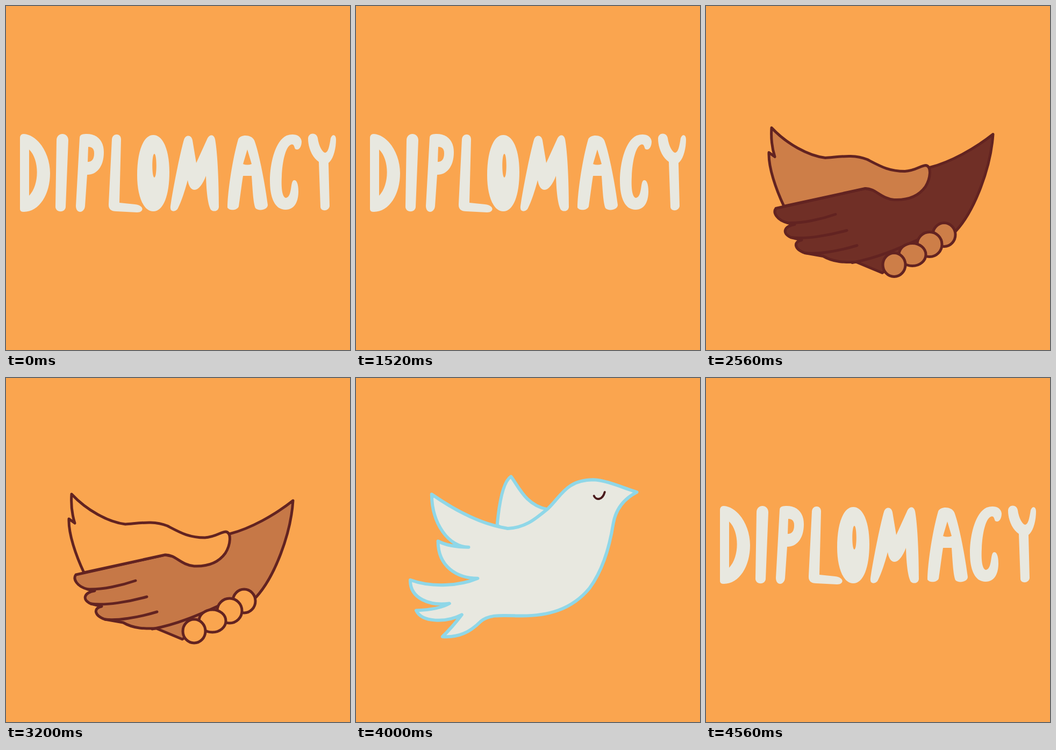
Recreate the animation shown at these times as an HTML page. Size 640 by 640 pixels, loop 4.72 s.

```html
<!DOCTYPE html>
<html lang="en">
<head>
<meta charset="utf-8">
<title>Diplomacy</title>
<style>
  html, body { margin: 0; width: 100%; height: 100%; overflow: hidden; background: #faa54f; }
  svg { display: block; width: 100vw; height: 100vh; --k: 0%; --m: 0%; }
  path, ellipse { stroke-linecap: round; stroke-linejoin: round; }
  #word path { fill: #e8e8e0; fill-rule: evenodd; transform-box: fill-box; transform-origin: center; }
  .skin { stroke: #622321; stroke-width: 5; }
  .thick { stroke-width: 6; }
  .line { fill: none; }
  .thin { stroke-width: 4; }
  .left { fill: color-mix(in srgb, #c67847, #faa54f var(--k)); }
  .right { fill: color-mix(in srgb, #622321, #c67847 var(--k)); }
  #bird path {
    fill: color-mix(in srgb, #d98b4c, #e8e8e0 var(--m));
    stroke: color-mix(in srgb, #622321, #8fd7e8 var(--m));
    stroke-width: 6;
  }
  #bird .line { fill: none; }
  #bird #eye { stroke: #4a1a1c; stroke-width: 4; }
</style>
</head>
<body>
<svg viewBox="0 0 640 640" xmlns="http://www.w3.org/2000/svg">
  <defs><clipPath id="grip"><rect x="140" width="358" height="640"/></clipPath></defs>

  <g id="word" role="img" aria-label="DIPLOMACY">
    <path d="M26 246Q26 238 33 238C60 240 82 275 82 311C82 350 62 383 33 383Q26 383 26 378ZM43 267C62 285 63 332 43 353Z"/>
    <path d="M94 250C94 234 116 234 116 250L111 374C110 385 93 385 92 374Z"/>
    <path d="M137 245Q137 238 148 238C170 237 182 251 182 272C182 300 168 314 151 314L147 372C146 386 130 387 130 372ZM153 262Q164 262 164 274Q164 290 152 290Z"/>
    <path d="M197 248C198 236 214 236 214 248L211 366L240 369C258 371 257 384 244 384L205 382Q190 382 191 368Z"/>
    <path/>
    <path d="M331 249C334 239 345 239 347 250L354 292L374 248C378 238 387 238 389 248C393 270 396 320 396 374C395 383 385 383 381 379C376 370 373 350 372 316C366 332 358 342 351 342C344 342 340 335 338 324C334 340 326 365 320 376C317 383 306 384 306 376C306 366 322 280 331 249Z"/>
    <path d="M432 248C436 239 456 238 462 250C470 270 482 330 487 370C487 380 469 382 464 376C460 366 459 345 457 316L441 316C438 335 435 360 433 373C430 381 415 381 412 375C412 350 420 290 432 248ZM449 267L457 294Q449 297 441 294Z"/>
    <path d="M550 252C549 240 535 236 522 241C502 250 491 290 491 325C491 360 502 379 520 379C538 379 544 362 544 345C544 326 538 322 534 325C529 330 532 355 521 357C513 356 512 335 513 317C514 290 520 262 530 258C536 256 536 262 538 266C545 270 550 262 550 252Z"/>
    <path d="M562 247C562 235 578 234 580 246C582 260 588 272 594 273C600 272 602 258 604 246C607 237 614 239 614 248C614 268 608 286 600 292L602 372C601 382 586 383 585 374L582 290C570 282 562 264 562 247Z"/>
  </g>

  <g id="leftHand" class="skin thick">
    <path class="left" d="M-60 157L-10 198C30 236 62 259 100 263C130 259 160 268 190 268C212 267 230 262 244 261C256 262 252 283 240 293C228 304 205 306 188 309C215 325 240 345 285 357C303 361 300 377 281 375L262 374C280 382 291 390 285 400C278 408 260 406 248 404C266 408 274 418 268 427C258 436 235 432 220 428C236 436 238 450 226 455C200 462 150 460 110 446C62 427 22 388 -10 349L-60 290"/>
    <g class="line thin">
      <path d="M179 310L200 307M262 375C235 370 205 358 180 345M248 404C222 402 195 394 177 383M220 428C200 428 175 420 160 414"/>
      <path d="M108 331C125 350 133 380 131 404M116 346C130 347 148 344 161 339"/>
    </g>
  </g>
  <g id="rightHand" class="skin thin">
    <path class="right" d="M700 155L650 200C615 235 580 262 545 270C510 270 480 277 450 276C425 274 400 270 388 270C376 274 382 293 396 304C410 316 425 318 441 320C415 337 390 355 350 364C332 368 330 386 350 389L366 388C345 396 340 410 352 417C358 421 366 419 374 419C360 424 360 440 372 445C385 447 395 445 406 445C396 452 396 468 412 471C450 474 500 468 545 450C594 430 630 396 650 358L700 300"/>
  </g>

  <g id="bird">
    <path id="wing"/>
    <path id="body"/>
    <g id="folds">
      <path class="line" d="M282 288Q305 284 322 272"/>
      <path class="line" style="stroke-width:9" d="M436 393C420 415 395 432 340 442"/>
    </g>
    <path class="line" id="eye" d="M446 218C450 227 462 226 466 211"/>
  </g>

  <g id="shake" class="skin">
    <g id="arms" class="thick">
      <path class="left" d="M-10 196C30 215 90 222 150 246L200 262L145 362C100 380 40 370 -10 345"/>
      <path class="right" d="M650 200C610 220 560 235 500 254L470 400C530 400 600 400 650 360"/>
    </g>
    <g id="clasp">
      <path class="right" d="M534 228C500 255 455 280 416 290L350 340L296 329L130 366C124 374 132 388 152 393L165 396C146 399 140 412 158 420L178 425C162 428 164 442 184 449L218 455C240 468 265 466 280 466L328 486L380 450L465 408C500 370 530 290 534 228Z"/>
      <path class="line" d="M152 393C180 394 215 386 241 377M158 420C185 424 230 416 262 407M184 449C205 452 245 446 281 435M272 467C320 458 360 440 395 424"/>
      <path class="left" d="M122 216C150 246 190 268 222 272C250 270 275 265 300 275C325 288 340 297 370 297C390 296 400 286 409 286C420 288 418 310 408 326C395 344 375 351 350 350C325 348 315 328 296 329L145 362C130 330 116 290 117 262L128 270Q120 245 122 216Z"/>
      <g class="left">
        <ellipse cx="443" cy="415" rx="21" ry="22"/>
        <ellipse cx="416" cy="433" rx="23" ry="23"/>
        <ellipse cx="384" cy="452" rx="25" ry="21"/>
        <ellipse cx="350" cy="471" rx="21" ry="22"/>
      </g>
    </g>
  </g>
</svg>
<script>
  const STEP = 80, FRAMES = 59;
  const ENTER = 25, CLASP = 29, LOOSE = 31, HATCH = 40, GLIDE = 45, TAKEOFF = 49, FLAP = 53, GONE = 57;

  const $ = id => document.getElementById(id);
  const svg = document.querySelector('svg');
  const letters = [...$('word').children];

  const ring = 'M274 240C293 240 304 270 304 309C304 352 293 382 274 382C255 382 244 352 244 315C244 272 255 240 274 240Z';
  const narrowO = ring + 'M276 275C281 275 281 319 276 319C271 319 271 275 276 275Z';
  const wideO = ring + 'M279 268C290 268 287 306 278 306C269 306 271 268 279 268Z';

  // Same commands in each outline, so their numbers can be blended
  const claspShape = 'M122 216C150 246 190 268 222 272C275 262 325 297 370 297C390 296 416 290 440 279C475 265 505 250 534 228'
    + 'C531 260 524 295 513 320C501 352 487 385 465 408'
    + 'C460 450 400 470 372 475C362 497 340 497 328 486C310 478 290 466 280 466C260 468 240 465 218 455'
    + 'C205 452 190 451 184 449C164 442 162 428 178 425C175 424 164 422 158 420C140 412 146 399 165 396'
    + 'C132 388 124 374 130 366C135 364 140 363 145 362C130 330 100 260 122 216Z';
  const glideShape = 'M143 215C190 248 240 272 285 279C320 278 340 258 360 242C385 218 395 188 445 188C470 189 500 203 526 211'
    + 'C505 222 487 240 482 270C474 320 460 360 438 390'
    + 'C405 430 360 444 300 442C270 441 250 440 235 452C215 472 195 483 163 481C178 467 190 452 199 440'
    + 'C170 455 125 455 114 432C140 431 160 428 176 419C140 424 102 410 103 375C145 390 195 386 229 372'
    + 'C190 372 155 350 155 303C168 310 190 314 212 314C175 314 143 270 143 215Z';
  const flapShape = 'M321 121C360 170 430 182 490 200C550 212 590 170 614 134C645 95 670 81 704 81C736 83 775 101 808 111'
    + 'C781 126 758 149 752 188C741 253 723 305 695 344'
    + 'C650 385 590 410 530 412C500 411 475 406 455 407C430 432 400 466 340 463C360 445 373 425 376 407'
    + 'C350 420 295 430 278 395C305 394 330 388 352 381C310 386 265 370 264 321C315 335 385 333 434 318'
    + 'C390 322 345 295 347 264C362 270 395 270 412 260C350 245 300 180 321 121Z';
  const glideWing = 'M265 273C268 240 275 192 291 182C305 200 318 235 358 243L310 300Z';
  const flapWing = 'M460 190C460 140 480 95 502 75C515 115 560 165 590 158L520 230Z';

  const mix = (a, b, k) => a + (b - a) * k;
  function blend(from, to, k) {
    const ends = to.match(/[\d.]+/g);
    let i = 0;
    return from.replace(/[\d.]+/g, n => mix(+n, +ends[i++], k).toFixed(1));
  }

  const clamp = v => Math.min(1, Math.max(0, v));
  const show = (el, on) => { el.style.display = on ? '' : 'none'; };
  const move = (el, x, y) => el.setAttribute('transform', `translate(${x} ${y})`);
  const percent = (name, v) => svg.style.setProperty(name, v * 100 + '%');

  letters[4].setAttribute('d', narrowO);
  const centers = letters.map(el => {
    const box = el.getBBox();
    return box.x + box.width / 2;
  });

  const drift = f => 100 * Math.max(0, f - FLAP);

  // Hands close in on the word; later the bird's tail uncovers it
  function inView(x, f) {
    if (f < ENTER || f >= GONE) return true;
    if (f < CLASP) return Math.abs(x - 345) < 115 + 90 * (ENTER + 2 - f);
    return f > FLAP + 1 && x < 264 + drift(f);
  }

  function drawWord(f) {
    const resting = (f + 2) % FRAMES < 6;
    const pose = resting ? 0 : -Math.round(Math.sin(Math.PI * 8 * f / 19));
    letters.forEach((el, i) => {
      const lean = (i % 2 ? 1 : -1) * pose;
      show(el, inView(centers[i], f));
      el.style.transform = `translateX(${lean}px) rotate(${lean * .7}deg)`;
    });
    letters[4].setAttribute('d', pose > 0 ? wideO : narrowO);
  }

  function drawHands(f) {
    const on = f >= ENTER && f < CLASP, left = ENTER + 2 - f;
    const x = -62 * left - 16 * left * left, y = 8 * Math.max(0, -left);
    show($('leftHand'), on);
    show($('rightHand'), on);
    move($('leftHand'), x, y);
    move($('rightHand'), -x, y);
  }

  function drawShake(f) {
    const armed = f < LOOSE;
    show($('shake'), f >= CLASP && f <= HATCH);
    show($('arms'), armed);
    $('clasp').setAttribute('clip-path', armed ? 'url(#grip)' : 'none');
    move($('shake'), 0, 14 * Math.sin(Math.PI * (f - LOOSE) / 3) ** 2);
    percent('--k', clamp((f - LOOSE) / 7));
  }

  function drawBird(f) {
    show($('bird'), f > HATCH && f < GONE);
    const grow = 1 - (1 - clamp((f - HATCH) / (GLIDE - HATCH))) ** 2;
    const t = clamp((f - TAKEOFF) / (FLAP - TAKEOFF));
    const flap = t * t * (1.6 * t - .6);
    percent('--m', grow);
    $('body').setAttribute('d', t > 0 ? blend(glideShape, flapShape, flap) : blend(claspShape, glideShape, grow));
    $('wing').setAttribute('d', blend(glideWing, flapWing, flap));
    $('wing').setAttribute('transform', `translate(310 275) scale(${grow}) translate(-310 -275)`);
    show($('folds'), grow === 1 && t === 0);
    show($('eye'), grow === 1);
    move($('eye'), 262 * flap, -98 * flap);
    move($('bird'), drift(f), 0);
  }

  function tick(now) {
    const f = Math.floor(now / STEP) % FRAMES;
    drawWord(f);
    drawHands(f);
    drawShake(f);
    drawBird(f);
    requestAnimationFrame(tick);
  }
  tick(0);
</script>
</body>
</html>
```
